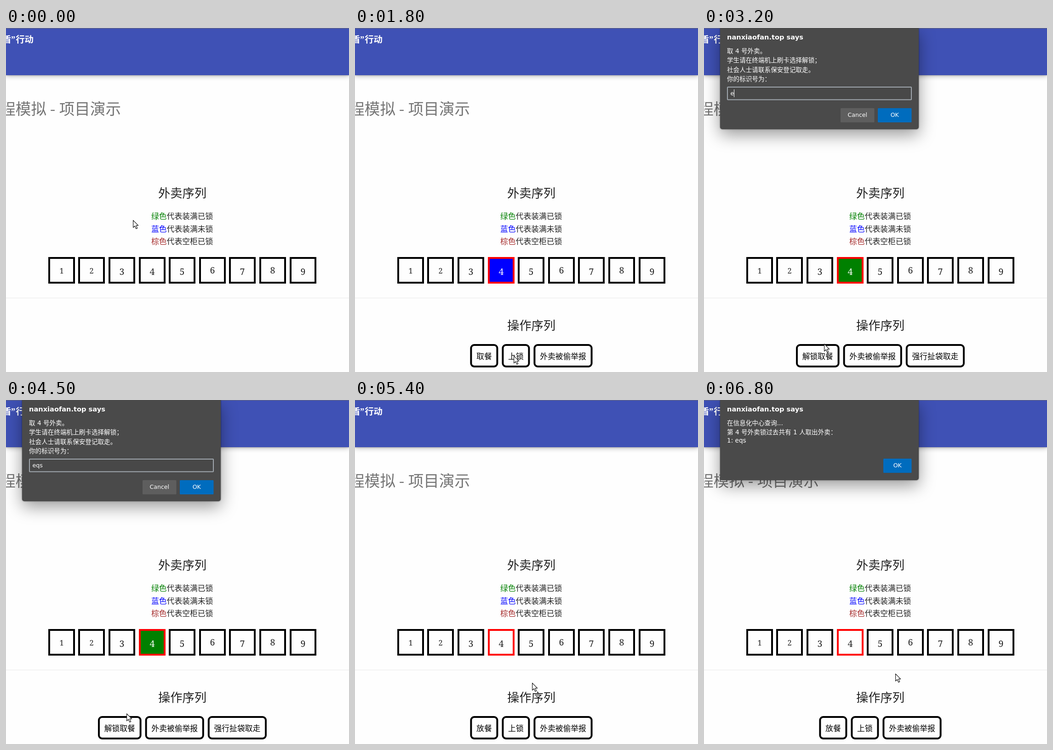
Write an HTML page that moves like this. It is 746 px wide and 751 px high and loops after 8500 ms.

```html
<!DOCTYPE html>
<html lang="zh-CN">
<head>
<meta charset="utf-8">
<style>
  html, body { margin: 0; width: 100%; height: 100%; overflow: hidden; background: #fff; }
  #stage { position: relative; width: 746px; height: 751px; overflow: hidden; background: #fefefe; }
  svg { position: absolute; left: 0; top: 0; overflow: visible; }
  text { font-family: "Noto Sans CJK SC", "Noto Sans CJK", "Noto Sans CJK JP", sans-serif; white-space: pre; }
  #header {
    position: absolute; left: 0; top: 0; width: 746px; height: 103px; background: #3f51b5;
    box-shadow: 0 1px 3px rgba(0,0,0,.22), 0 3px 10px rgba(0,0,0,.22);
  }
  #dialog {
    position: absolute; left: 35px; top: 0; width: 432px; background: #4a4a4a;
    border-radius: 0 0 5px 5px; transform-origin: 50% 0;
    box-shadow: 0 0 3px rgba(0,0,0,.5), 0 12px 36px rgba(0,0,0,.4);
  }
  #dialog text { font-family: "DejaVu Sans", "Noto Sans CJK SC", "Noto Sans CJK", "Noto Sans CJK JP", sans-serif; fill: #fff; }
  text.serif { font-family: "Noto Serif", serif; }
</style>
</head>
<body>
<div id="stage">
  <div id="header"></div>
  <svg id="page" width="746" height="751"></svg>
  <div id="dialog"><svg id="panel" width="432" height="221"></svg></div>
  <svg width="746" height="751">
    <path id="cursor" d="M.6 .8V16.6L4.3 13.2L6.9 19.3L9.6 18.1L7 12.2H11.6Z"
          fill="#fff" stroke="#1c1c1c" stroke-width="1.2" stroke-linejoin="round"/>
  </svg>
</div>
<script>
const LOOP = 8500, STEP = 100;
const USER_ID = "eqs";
const CENTER = 383.5, INK = "#212121", PAPER = "#fefefe";
const BODY = 16.8, TITLE = 26.25, HEADLINE = 33.6;
const $ = id => document.getElementById(id);

function add(parent, tag, attrs, content) {
  const el = document.createElementNS("http://www.w3.org/2000/svg", tag);
  for (const key in attrs) el.setAttribute(key, attrs[key]);
  if (content !== undefined) el.textContent = content;
  parent.appendChild(el);
  return el;
}
const label = (parent, x, y, size, fill, content, anchor = "start", more = {}) =>
  add(parent, "text", { x, y, "font-size": size, fill, "text-anchor": anchor, ...more }, content);
const frame = (parent, x, y, width, height, rx = 0) =>
  add(parent, "rect", {
    x: x + 2, y: y + 2, width: width - 4, height: height - 4, rx, fill: PAPER, stroke: "#000", "stroke-width": 4
  });
const show = (el, on) => el.setAttribute("display", on ? "inline" : "none");

// Page
const page = $("page");
const bold = { "font-weight": 700 };
add(page, "rect", { width: 746, height: 1, fill: "#6b6b75" });
label(page, 11, 32, 19.4, "#fff", "盾", "end", bold);
label(page, 11, 32, 19.4, "#fff", "”", "start", { ...bold, class: "serif" });
label(page, 60, 32, 19.4, "#fff", "行动", "end", bold);
label(page, 88, 189, HEADLINE, "#757575", "程模拟", "end");
label(page, 101.5, 189, HEADLINE, "#757575", "-", "middle");
label(page, 250, 189, HEADLINE, "#757575", "项目演示", "end");
label(page, CENTER, 370, TITLE, INK, "外卖序列", "middle");

[["绿色", "代表装满已锁", "green"], ["蓝色", "代表装满未锁", "blue"], ["棕色", "代表空柜已锁", "brown"]]
  .forEach(([name, meaning, color], i) => {
    const y = Math.round(417 + 27.5 * i);
    label(page, 316, y, BODY, color, name);
    label(page, 316 + 2 * BODY, y, BODY, INK, meaning);
  });

const cells = Array.from({ length: 9 }, (_, i) => {
  const x = Math.round(91.7 + 65.6 * i), n = i + 1;
  // Old-style figures: 1 and 2 are short, odd ones and 4 descend
  const short = n < 3, level = short || n === 6 || n === 8;
  return {
    box: frame(page, x, 500, 58, 58),
    digit: label(page, x + 29, level ? 536 : 539, short ? 16.5 : 19.5, INK, n, "middle", { class: "serif" })
  };
});
add(page, "rect", { y: 589, width: 746, height: 1, fill: "#e8e8e8" });

const actions = add(page, "g", {});
label(actions, CENTER, 659, TITLE, INK, "操作序列", "middle");

function buttonRow(captions) {
  const row = add(actions, "g", {}), gap = 8;
  const widths = captions.map(c => c.length * BODY + 27.4);
  let x = CENTER - (widths.reduce((a, b) => a + b) + gap * (captions.length - 1)) / 2;
  const texts = captions.map((caption, i) => {
    const width = widths[i];
    frame(row, x, 690, width, 51, 7);
    const text = label(row, x + width / 2, 723, BODY, "#000", caption, "middle");
    x += width + gap;
    return text;
  });
  return { row, texts };
}
const unlocked = buttonRow(["放餐", "上锁", "外卖被偷举报"]);
const locked = buttonRow(["解锁取餐", "外卖被偷举报", "强行扯袋取走"]);

// Dialogs, drawn in page coordinates
const panel = add($("panel"), "g", { transform: "translate(-35 0)" });
label(panel, 50, 25, 14.6, "#fff", "nanxiaofan.top says", "start", bold);

function dialogBody(lines) {
  const body = add(panel, "g", {});
  let y = 34.6;
  for (const line of lines) {
    y += /[^\x00-\x7f]/.test(line) ? 20.4 : 17.4; // Latin-only lines are lower
    label(body, 50, Math.round(y), 13.6, "#fff", line);
  }
  return body;
}
function dialogButton(parent, x, y, width, fill, caption) {
  add(parent, "rect", { x, y, width, height: 31, rx: 1.5, fill });
  label(parent, x + width / 2, y + 19, 12.6, "#fff", caption, "middle");
}
const prompt = dialogBody(["取 4 号外卖。", "学生请在终端机上刷卡选择解锁；", "社会人士请联系保安登记取走。", "你的标识号为："]);
add(prompt, "rect", { x: 51, y: 129, width: 400, height: 27.5, rx: 1, fill: "#484848", stroke: "#a0a7ae", "stroke-width": 2 });
const typed = label(prompt, 57.6, 147, 12.6, "#fff", "");
const caret = add(prompt, "rect", { y: 134, width: 1, height: 17, fill: "#fff" });
dialogButton(prompt, 297, 175, 73.5, "#5e5e5e", "Cancel");
dialogButton(prompt, 378, 175, 73.5, "#006cbe", "OK");

const report = dialogBody(["在信息化中心查询...", "第 4 号外卖锁过去共有 1 人取出外卖：", "1: " + USER_ID]);
dialogButton(report, 390, 128, 61.5, "#006cbe", "OK");

// Pointer stops: time, x, y
const stops = [
  [0, 276, 419], [900, 308, 535], [1500, 282, 710], [1800, 345, 715], [2000, 345, 715],
  [2500, 289, 709], [2600, 257, 730], [2800, 257, 730], [3200, 261, 689], [4500, 262, 684],
  [4900, 408, 194], [5300, 365, 582], [5400, 385, 617], [5800, 452, 723], [6300, 451, 720],
  [6400, 447, 697], [6800, 416, 597], [LOOP, 416, 597]
];
function pointerAt(t) {
  const i = stops.findIndex(s => s[0] > t);
  const [t0, x0, y0] = stops[i - 1], [t1, x1, y1] = stops[i];
  const k = (t - t0) / (t1 - t0);
  return [x0 + (x1 - x0) * k, y0 + (y1 - y0) * k];
}

const AT = { select: 800, fill: 1500, lock: 2000, prompt: 2800, type: 3200, closing: 5000, closed: 5100, report: 6400 };

// Glides in from a slight backward tilt, leaves enlarged and faded
function glide(dialog, age, closing) {
  const tilt = closing ? 1 : Math.max(0, 1 - age / 115);
  dialog.style.opacity = closing ? 0.4 : 1 - 0.48 * tilt;
  dialog.style.transform = tilt
    ? `scale(${closing ? 1.04 : 1}) matrix3d(1,0,0,0, 0,${1 + 0.006 * tilt},0,${-0.000085 * tilt}, 0,0,1,0, 0,${-11 * tilt},0,1)`
    : "none";
}

function drawDialog(t) {
  const asking = t >= AT.prompt && t < AT.closed, reporting = t >= AT.report;
  const dialog = $("dialog");
  dialog.style.display = asking || reporting ? "block" : "none";
  dialog.style.height = (asking ? 221 : 175) + "px";
  show(prompt, asking);
  show(report, reporting);
  glide(dialog, t - (asking ? AT.prompt : AT.report), asking && t >= AT.closing);
  if (!asking) return;

  const count = Math.max(0, Math.floor((t - AT.type) / 300) + 1);
  typed.textContent = USER_ID.slice(0, count);
  caret.setAttribute("x", Math.round(57.6 + (count ? typed.getComputedTextLength() : -1.6)));
  const idle = t - 3800;
  show(caret, idle < 0 || Math.floor(idle / 500) % 2 === 0);
}

function draw(t) {
  const { box, digit } = cells[3];
  const selected = t >= AT.select;
  const full = t >= AT.fill && t < AT.closed, isLocked = t >= AT.lock && t < AT.closed;
  box.setAttribute("stroke", selected ? "#f00" : "#000");
  box.setAttribute("fill", isLocked ? "green" : full ? "blue" : PAPER);
  digit.setAttribute("fill", full ? "#fff" : INK);

  show(actions, selected);
  show(unlocked.row, !isLocked);
  show(locked.row, isLocked);
  unlocked.texts[0].textContent = full ? "取餐" : "放餐";

  drawDialog(t);
  $("cursor").setAttribute("transform", `translate(${pointerAt(t)})`);
}

const start = performance.now();
function tick() {
  const t = (performance.now() - start) % LOOP;
  draw(Math.floor(t / STEP) * STEP);
  requestAnimationFrame(tick);
}
tick();
</script>
</body>
</html>
```
